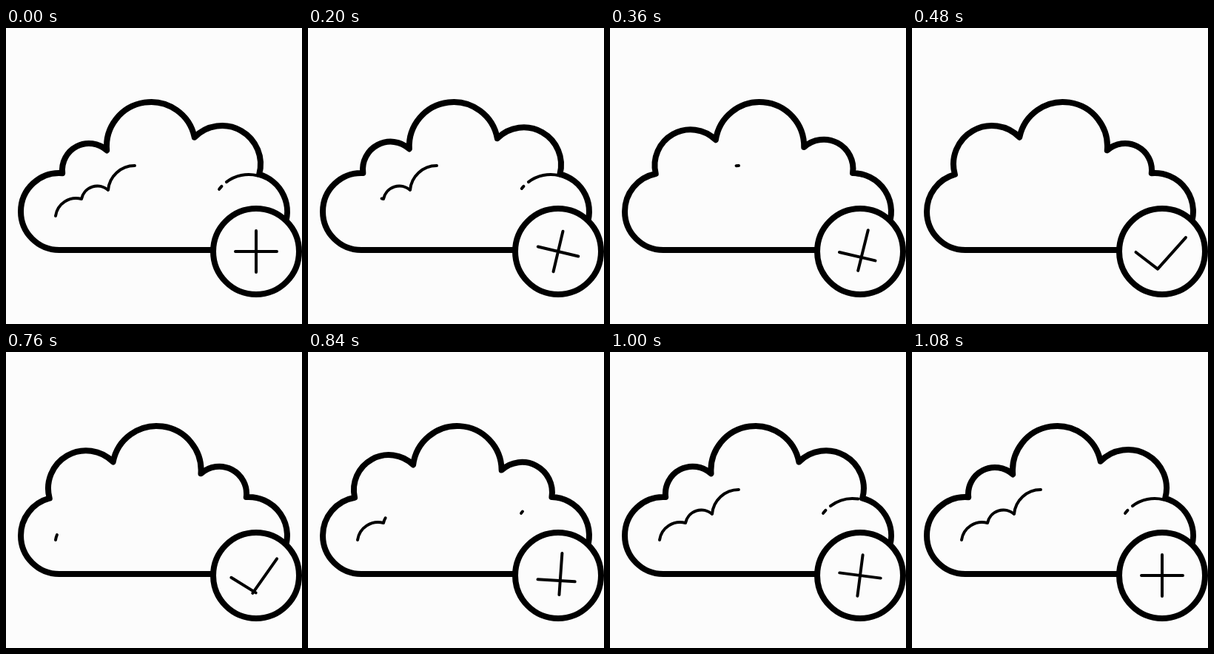
An HTML page that plays this animation: 400 px wide and 400 px high, repeating every 1.16 s.

```html
<!DOCTYPE html>
<html lang="en">
<head>
<meta charset="utf-8">
<title>Cloud add / done</title>
<style>
  html, body { margin: 0; width: 100%; height: 100%; overflow: hidden; background: #fcfcfc; }
  svg { display: block; width: 100vw; height: 100vh; }
  path, circle { fill: none; stroke: #000; stroke-linecap: round; stroke-linejoin: round; }
  .bold { stroke-width: 8; }
  .thin { stroke-width: 4; }
</style>
</head>
<body>
<svg viewBox="0 0 400 400">
  <path id="left" class="thin" pathLength="1"
    d="M67 254A28 28 0 0 1 102 231A22 22 0 0 1 138 219A36 36 0 0 1 174 186"/>
  <path id="right" class="thin"/>
  <path id="cloud" class="bold"/>
  <circle class="bold" cx="338" cy="302" r="58" style="fill:#fcfcfc"/>
  <path id="mark" class="thin"/>
</svg>
<script>
const LOOP = 1160, STEP = 40, BACK = 760;
const [left, right, cloud, mark] = ['left', 'right', 'cloud', 'mark'].map(id => document.getElementById(id));

const clamp = v => Math.min(1, Math.max(0, v));
const ease = u => u < 0.5 ? 2 * u * u : 1 - 2 * (1 - u) ** 2;
const ramp = (t, start, length) => ease(clamp((t - start) / length));
const mix = (a, b, s) => a.map((v, i) => v + (b[i] - v) * s);
const pt = p => p.map(v => v.toFixed(2)).join(' ');

// Upper crossing of two circles [x, y, r], the first one further left.
function crossing([x1, y1, r1], [x2, y2, r2]) {
  const dx = x2 - x1, dy = y2 - y1, d = Math.hypot(dx, dy);
  const a = (d * d + r1 * r1 - r2 * r2) / (2 * d);
  const h = Math.sqrt(r1 * r1 - a * a);
  return [x1 + (a * dx + h * dy) / d, y1 + (a * dy - h * dx) / d];
}

function drawCloud(s) {
  const puffs = [
    [72, 248, 52],
    mix([112, 192, 36], [108, 184, 52], s),
    mix([196, 160, 60], [204, 160, 60], s),
    mix([292, 184, 52], [288, 192, 36], s),
    [328, 248, 52]
  ];
  let d = 'M290 300H72A52 52 0 0 1 20 248';
  puffs.forEach((puff, i) => {
    const end = i < 4 ? crossing(puff, puffs[i + 1]) : [375.1, 270];
    d += `A${puff[2]} ${puff[2]} 0 0 1 ${pt(end)}`;
  });
  cloud.setAttribute('d', d);
}

function drawMark(turn, morph) {
  const angle = turn * 135 * Math.PI / 180, c = Math.cos(angle), s = Math.sin(angle);
  const place = (from, to) => {
    const [x, y] = mix(from, to, morph);
    return pt([338 + c * x - s * y, 302 + s * x + c * y]);
  };
  const elbow = [20.9, -12.4];
  mark.setAttribute('d',
    `M${place([0, -28], elbow)}L${place([0, 28], [25.8, 24.4])}` +
    `M${place([-28, 0], [-36, -9.2])}L${place([28, 0], elbow)}`);
}

function drawLeft(from, to) {
  left.style.visibility = to - from > 0.002 ? 'visible' : 'hidden';
  left.setAttribute('stroke-dasharray', `${to - from} 2`);
  left.setAttribute('stroke-dashoffset', -from);
}

function drawRight(from, to) {
  const onArc = deg => {
    const a = deg * Math.PI / 180;
    return pt([328 + 50 * Math.cos(a), 248 - 50 * Math.sin(a)]);
  };
  const first = 143 - 67 * from, last = 143 - 67 * to;
  let d = '';
  for (const [a, b] of [[143, 137], [127, 76]]) {
    const start = Math.min(a, first), end = Math.max(b, last);
    if (start - end > 0.1) d += `M${onArc(start)}A50 50 0 0 1 ${onArc(end)}`;
  }
  right.setAttribute('d', d);
}

function render(time) {
  const t = Math.floor((time % LOOP) / STEP) * STEP;
  if (t < BACK) {
    const s = ramp(t, 120, 360);
    drawCloud(s);
    drawMark(s, ramp(t, 280, 200));
    drawLeft(ramp(t, 75, 320), 1);
    drawRight(ramp(t, 175, 247), 1);
  } else {
    const s = 1 - ramp(t, 703, 356);
    drawCloud(s);
    drawMark(s, 1 - ramp(t, 710, 212));
    drawLeft(0, ramp(t, 714, 292));
    drawRight(0, ramp(t, 800, 250));
  }
}

const began = performance.now();
function tick() {
  render(performance.now() - began);
  requestAnimationFrame(tick);
}
tick();
</script>
</body>
</html>
```
